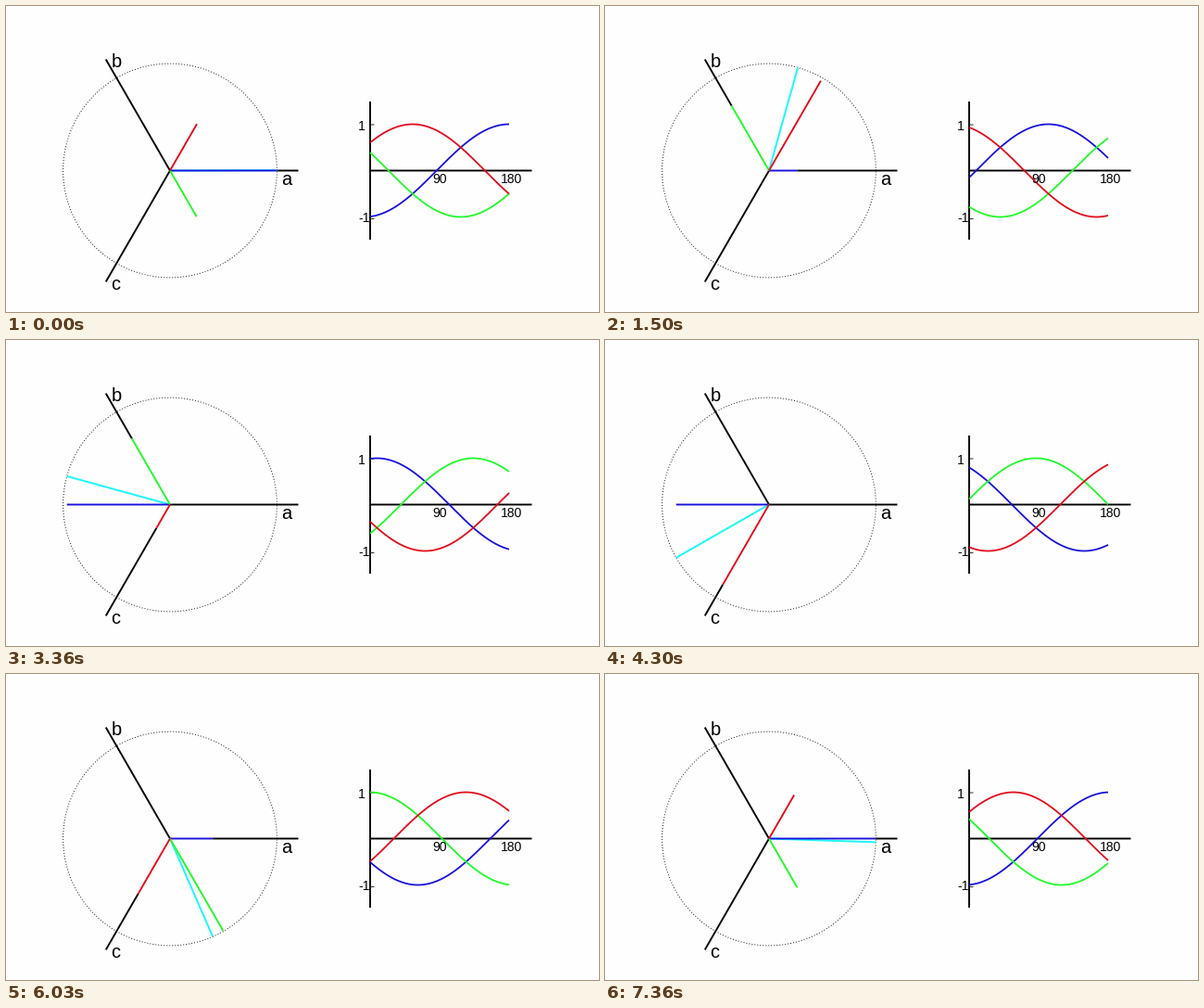
A matplotlib script for the animation above (7430 ms loop, 640 by 330 pixels).

```python
import numpy as np
import matplotlib.pyplot as plt
from matplotlib.animation import FuncAnimation

W, H, DPI = 640, 330, 100
PX = 72 / DPI
LOOP_MS, TICK_MS = 7430, 10

CX, CY, R = 177, 177.5, 115.4
X0, X1, Y0, AMP = 393, 543, 177.5, 50
PX_PER_DEG = 0.867

BLUE, GREEN, RED, CYAN = "#1810dc", "#20fa28", "#e20c1a", "#20f6fc"
PHASES = [(0, BLUE), (120, GREEN), (240, RED)]

plt.rcParams["font.family"] = "Liberation Sans"
fig = plt.figure(figsize=(W / DPI, H / DPI), dpi=DPI, facecolor="#fefefe")
ax = fig.add_axes([0, 0, 1, 1])
ax.set_xlim(0, W)
ax.set_ylim(H, 0)
ax.axis("off")


def line(xs, ys, color="black", width=1.9, z=2, **kw):
    return ax.plot(xs, ys, color=color, lw=width * PX, zorder=z, snap=False,
                   solid_capstyle="butt", **kw)[0]


def label(x, y, text, size):
    ax.text(x, y, text, fontsize=size * PX, ha="left", va="baseline", zorder=6)


def polar(radius, deg):
    a = np.radians(deg)
    return CX + radius * np.cos(a), CY - radius * np.sin(a)


def set_spoke(artist, start, end, deg):
    artist.set_data(*polar(np.array([start, end]), deg))


# Phasor diagram
line(*polar(R, np.linspace(0, 360, 361)), color="#202020", width=1, z=1,
     dashes=(1, 2), dash_capstyle="butt")
label(297, 193, "a", 20)
label(113.5, 66, "b", 20)
label(113.5, 306, "c", 20)

# Wave chart
line([X0, X0], [103, 252])
line([X0, 567.5], [Y0, Y0])
for y in (128, 229.5):
    line([X0, X0 + 4.5], [y, y], color="#303030", width=1)
label(380, 134, "1", 14)
label(380, 233, "-1", 14)
label(460, 191, "90", 14)
label(534, 191, "180", 14)

total = line([], [], CYAN, 2, z=3)
axes = [line([], []) for _ in PHASES]
spokes = [line([], [], color, z=4) for _, color in PHASES]
waves = [line([], [], color, 1.8, z=5) for _, color in PHASES]

xs = np.linspace(X0, X1, 151)
lag = (X1 - xs) / PX_PER_DEG


def angle(tick):
    """Field angle in degrees, held for each of 15 poses a second."""
    pose = (3 * tick + 12) // 20
    return 0.2 + 3.224 * pose


def update(tick):
    theta = angle(tick)
    set_spoke(total, 0, R, theta)
    for (deg, _), axis, spoke, wave in zip(PHASES, axes, spokes, waves):
        tip = R * np.cos(np.radians(theta - deg))
        # The black axis shows only beyond the coloured part
        set_spoke(axis, max(tip, 0), 1.2 * R, deg)
        set_spoke(spoke, 0, tip, deg)
        wave.set_data(xs, Y0 - AMP * np.cos(np.radians(theta - lag - deg)))
    return [total, *axes, *spokes, *waves]


anim = FuncAnimation(fig, update, frames=LOOP_MS // TICK_MS, interval=TICK_MS,
                     repeat=True, repeat_delay=0, blit=False)
plt.show()
```
